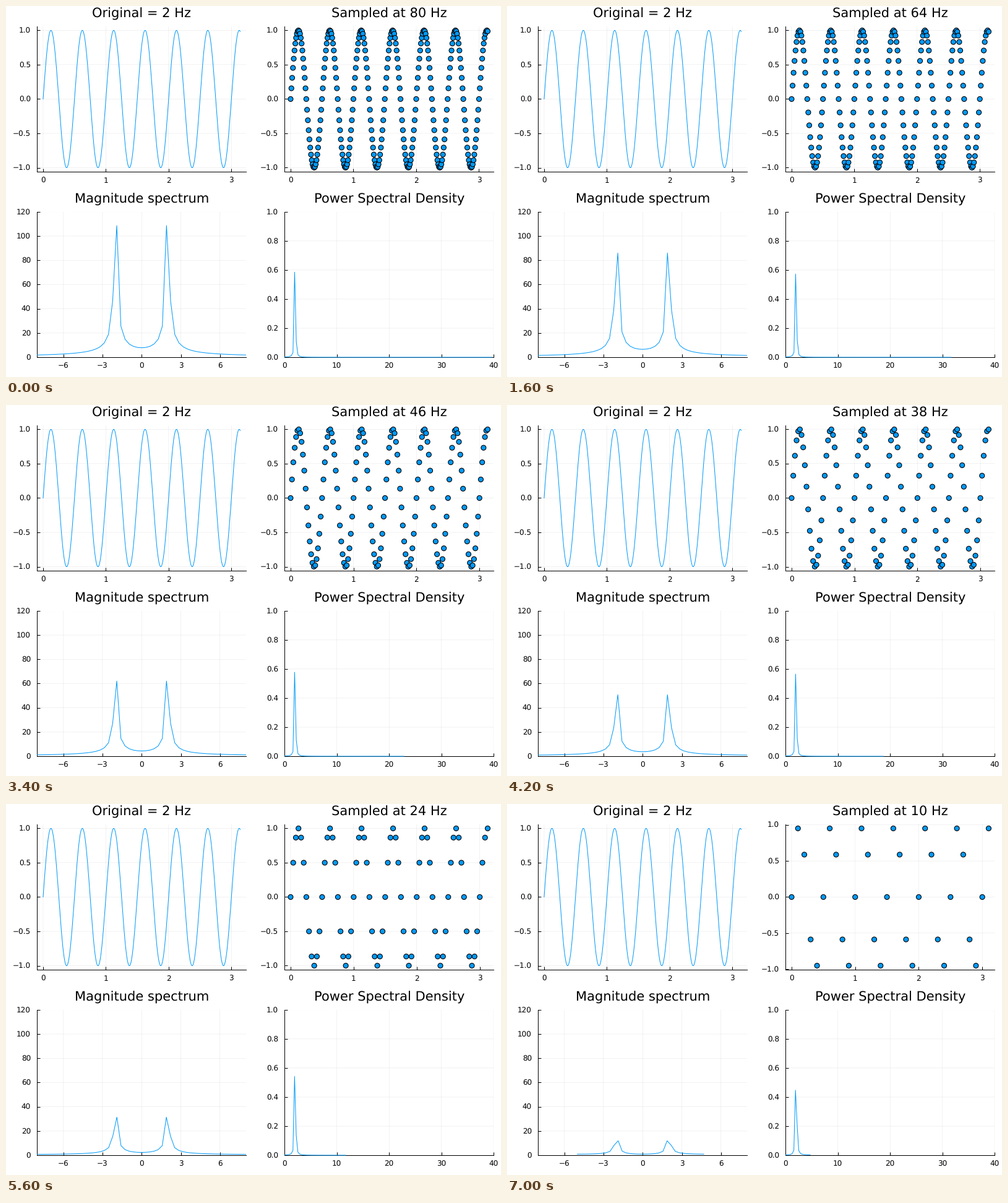
Recreate the animation shown at these times as a matplotlib script. Size 800 by 600 pixels, loop 7200 ms.

```python
import numpy as np
import matplotlib
import matplotlib.pyplot as plt
from matplotlib.animation import FuncAnimation

W, H, DPI = 800, 600, 100
PX = 72 / DPI                      # points per pixel
BLUE = "#009AFA"
TONE_HZ = 2
FRAMES, INTERVAL = 36, 200

LEFT, RIGHT, GAP = 50.4, 788, 62.4   # plot area edges and column gap
ROW_BOTTOM, ROW_HEIGHT = (268.1, 568.1), 235.3
TITLE_EM, TICK_EM = 21, 12
DIGIT = 0.636 * TICK_EM            # extra margin for one more label digit

matplotlib.rcParams.update({
    "font.family": "DejaVu Sans",
    "text.hinting": "none",
    "text.kerning_factor": 0,
})

fig = plt.figure(figsize=(W / DPI, H / DPI), dpi=DPI, facecolor="white")


def place(ax, row, col, extra=0):
    width = (RIGHT - LEFT - GAP - extra) / 2
    x = LEFT if col == 0 else RIGHT - width
    ax.set_position([x / W, 1 - ROW_BOTTOM[row] / H, width / W, ROW_HEIGHT / H])


def set_title(ax, text):
    ax.set_title(text, fontsize=TITLE_EM * PX, y=1.0, pad=14.6 * PX)


def ticks(axis, step, lo, hi, decimals=0):
    """Put ticks at the multiples of step inside lo..hi."""
    k = np.arange(np.ceil(lo / step - 1e-9), np.floor(hi / step + 1e-9) + 1)
    values = k * step + 0.0
    labels = [f"{v:.{decimals}f}".replace("-", "\u2212") for v in values]
    axis.set_ticks(values, labels=labels)


def widen(values):
    lo, hi = np.min(values), np.max(values)
    pad = 0.03 * (hi - lo)
    return lo - pad, hi + pad


def make_axes(row, col, title):
    ax = fig.add_axes([0, 0, 1, 1])
    place(ax, row, col)
    set_title(ax, title)
    ax.patch.set_visible(False)
    ax.set_axisbelow(True)
    ax.grid(True, color="black", alpha=0.1, linewidth=0.5 * PX, snap=False)
    for side in ("top", "right"):
        ax.spines[side].set_visible(False)
    for side in ("left", "bottom"):
        ax.spines[side].set_linewidth(PX)
    ax.tick_params(direction="in", length=5 * PX, width=PX,
                   labelsize=TICK_EM * PX)
    ax.tick_params(axis="x", pad=9 * PX)
    ax.tick_params(axis="y", pad=10.4 * PX)
    return ax


def fit_wave(ax, t, wave):
    """Scale an axes to a sampled wave and choose its ticks."""
    x_lim, y_lim = widen(t), widen(wave)
    fine = y_lim[1] < 1
    ax.set_xlim(*x_lim)
    ax.set_ylim(*y_lim)
    ticks(ax.xaxis, 1, *x_lim)
    ticks(ax.yaxis, 0.25 if fine else 0.5, *y_lim, decimals=2 if fine else 1)
    return fine


def tone(t):
    return np.sin(2 * np.pi * TONE_HZ * t)


def line(ax, **style):
    return ax.plot([], [], color=BLUE, linewidth=PX, zorder=3, **style)[0]


wave_ax = make_axes(0, 0, f"Original = {TONE_HZ} Hz")
sample_ax = make_axes(0, 1, "")
mag_ax = make_axes(1, 0, "Magnitude spectrum")
psd_ax = make_axes(1, 1, "Power Spectral Density")
cells = ((wave_ax, 0, 0), (sample_ax, 0, 1), (mag_ax, 1, 0), (psd_ax, 1, 1))

t_fine = np.arange(0, np.pi, 0.01)
line(wave_ax).set_data(t_fine, tone(t_fine))
fit_wave(wave_ax, t_fine, tone(t_fine))

mag_ax.set_xlim(-8, 8)
mag_ax.set_ylim(0, 120)
ticks(mag_ax.xaxis, 3, -8, 8)
ticks(mag_ax.yaxis, 20, 0, 120)

psd_ax.set_xlim(0, 40)
psd_ax.set_ylim(0, 1)
ticks(psd_ax.xaxis, 10, 0, 40)
ticks(psd_ax.yaxis, 0.2, 0, 1, decimals=1)

mag_line = line(mag_ax)
psd_line = line(psd_ax, clip_on=False)
dots = sample_ax.scatter([], [], s=(8 * PX) ** 2, facecolor=BLUE,
                         edgecolor="black", zorder=3)
dots.set_linewidths((1.1 * PX, 1.1 * PX))   # a pair keeps subpixel positions


def update(i):
    rate = 80 - 2 * i
    n = int(np.pi * rate) + 1
    t = np.arange(n) / rate
    wave = tone(t)

    dots.set_offsets(np.column_stack((t, wave)))
    set_title(sample_ax, f"Sampled at {rate} Hz")
    fine = fit_wave(sample_ax, t, wave)
    for ax, row, col in cells:
        place(ax, row, col, DIGIT if fine else 0)

    freq = np.fft.fftshift(np.fft.fftfreq(n, 1 / rate))
    mag = np.fft.fftshift(np.abs(np.fft.fft(wave)))
    mag_line.set_data(freq, mag)
    right = freq >= 0
    psd_line.set_data(freq[right], mag[right] ** 2 / (n * rate))
    return dots, mag_line, psd_line


anim = FuncAnimation(fig, update, frames=FRAMES, interval=INTERVAL,
                     repeat=True, repeat_delay=0, blit=False)
plt.show()
```
